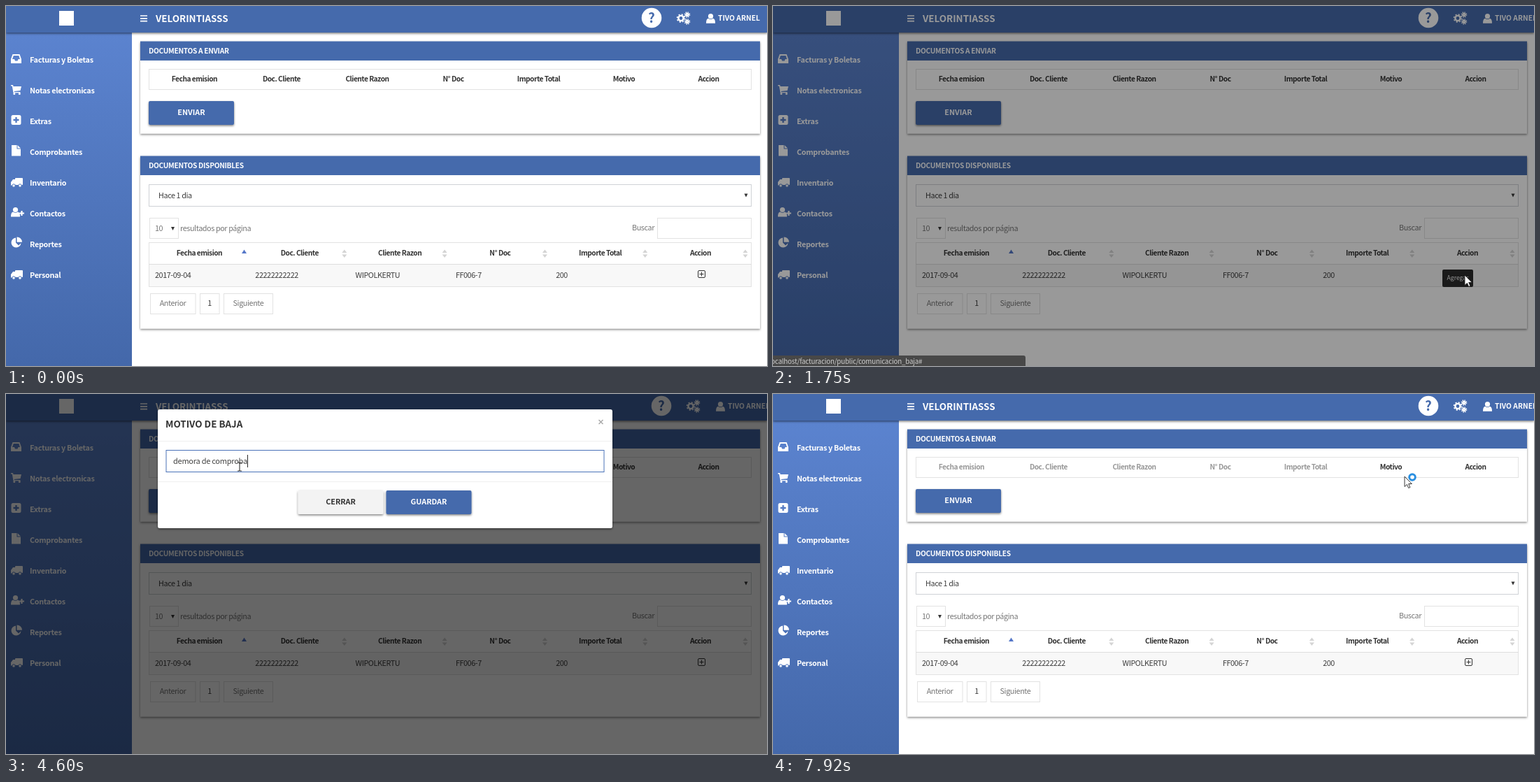
An HTML page that plays this animation: 1088 px wide and 515 px high, repeating every 8 s.

```html
<!DOCTYPE html>
<html lang="es">
<head>
<meta charset="utf-8">
<title>Documentos</title>
<style>
html, body { margin: 0; width: 100%; height: 100%; overflow: hidden; background: #fff; }
svg { display: block; width: 1088px; height: 515px; }
text { font-family: "Noto Sans CJK SC", "Noto Sans CJK JP", "Noto Sans CJK", Lato, sans-serif; font-size: 10.8px; white-space: pre; }
.menu { font-weight: 600; letter-spacing: -.3px; fill: #fff; }
.head { font-weight: 600; font-size: 10.2px; letter-spacing: -.5px; fill: #333; text-anchor: middle; }
.cell { letter-spacing: -.4px; fill: #3c3c3c; }
.soft { letter-spacing: -.4px; fill: #777; }
.caps { font-weight: 600; font-size: 10.2px; letter-spacing: -.3px; fill: #fff; }
.title { font-weight: 600; font-size: 13.4px; }
.btn { font-weight: 600; text-anchor: middle; }
.user { font-weight: 600; font-size: 10.3px; fill: #fff; }
.field { font-size: 11px; letter-spacing: -.25px; fill: #444; }
.mid { text-anchor: middle; }
.line { fill: #fff; stroke: #e2e2e2; }
.white { fill: #fff; }
.blue { fill: #456aac; }
</style>
</head>
<body>
<svg id="stage" viewBox="0 0 1088 515"></svg>
<script>
const BLUE = '#456aac';
const text = (x, y, s, cls, more = '') => `<text x="${x}" y="${y}" class="${cls}" ${more}>${s}</text>`;
const rect = (x, y, w, h, more = '') => `<rect x="${x}" y="${y}" width="${w}" height="${h}" ${more}/>`;
const path = (d, more = '') => `<path d="${d}" ${more}/>`;
const dot = (x, y, r, more = '') => `<circle cx="${x}" cy="${y}" r="${r}" ${more}/>`;
const group = (id, body, more = '') => `<g id="${id}" ${more}>${body}</g>`;

const truck = y => group('', rect(13, 0, 11, 10, 'rx="1"') + path('M7 10.500V6L10 2H13V10.500Z')
  + dot(11, 11, 2.2, 'stroke="#4f76bd"') + dot(20, 11, 2.2, 'stroke="#4f76bd"'), `transform="translate(0 ${y})"`);
const gear = (x, y, r) => dot(x, y, r, 'fill="none" stroke="#fff" stroke-width="2.4"')
  + dot(x, y, r + 1.9, `fill="none" stroke="#fff" stroke-width="1.6" stroke-dasharray="${(r + 1.9) * Math.PI / 8}"`);
const person = (x, y) => dot(x, y, 3.6) + path(`M${x - 6.5} ${y + 10}q0-6.500 3-7q3.500 2.500 7 0q3 .5 3 7z`);

function sidebar() {
  const items = ['Facturas y Boletas', 'Notas electronicas', 'Extras', 'Comprobantes',
    'Inventario', 'Contactos', 'Reportes', 'Personal'];
  const icons = path('M9.500 69H19.500L22 76V82H7V76ZM10.800 71L9 76H12L13 78.500H16.500L17.500 76H20L18.300 71Z', 'fill-rule="evenodd"')
    + path('M7 113H10L10.500 115H22L20.500 121L11.500 122L12 123H20.500V124.300H10.500L8.800 114.500H7Z')
    + dot(11.8, 125.4, 1.5) + dot(19.3, 125.4, 1.5)
    + rect(7.5, 156, 14, 14, 'rx="2.5"') + path('M14.500 159V167M10.500 163H18.500', 'stroke="#5379c2" stroke-width="2.3"')
    + path('M8 199H15.500V204.500H21V214.500H8ZM16.500 199L21 203.500H16.500Z')
    + truck(246) + person(13.5, 291.5) + path('M22.500 293V300M19 296.500H26', 'stroke="#fff" stroke-width="2.2"')
    + path('M14 331.500A7 7 0 1 0 21.500 339L18 342.500L14 338.500ZM15.500 330.500A7.200 7.200 0 0 1 23 337.700H15.500Z')
    + truck(378);
  return rect(0, 38, 180, 477, 'fill="url(#side)"') + group('', icons, 'class="white"')
    + items.map((s, i) => text(34, 81 + 44 * i, s, 'menu')).join('');
}

function header() {
  return rect(0, 0, 1088, 38, 'class="blue" filter="url(#drop)"')
    + rect(76, 7, 21, 21, 'class="white"')
    + path('M192 14H202M192 17.800H202M192 21.600H202', 'stroke="#fff" stroke-width="1.7"')
    + text(214, 23, 'VELORINTIASSS', 'title white')
    + group('tools', dot(923, 17, 14.3, 'class="white"')
      + text(923, 24, '?', 'title blue mid', 'style="font-size:19px"')
      + gear(965, 17.5, 3.6) + gear(974, 12.5, 1.6) + gear(974, 22.5, 1.6)
      + group('', person(1007.5, 14.7), 'class="white"') + text(1018, 20.5, 'TIVO ARNEL', 'user'));
}

const card = (y, h, title) => rect(192, y, 886, h, 'class="white" filter="url(#drop)"')
  + rect(192, y, 886, 27.5, 'class="blue"') + text(204, y + 17, title, 'caps');
const button = (x, y, label, fill, ink) => rect(x, y, 122, 34, `rx="2" fill="${fill}" filter="url(#drop)"`)
  + text(x + 61, y + 20, label, 'btn', `fill="${ink}"`);
const box = (x, y, w, h) => rect(x + .5, y + .5, w, h, 'class="line"');
const down = (x, y) => path(`M${x - 2.5} ${y - 2}h5l-2.500 5z`, 'fill="#333"');

function sorter(x, first) {
  return first ? path(`M${x - 3.5} 354l3.500-5.500l3.500 5.500z`, 'fill="#5577c8"')
    : path(`M${x - 3.5} 353l3.500-4.500l3.500 4.500zM${x - 3.5} 355.500l3.500 4.500l3.500-4.500z`, 'fill="#d4d4d4"');
}

function page() {
  const top = [['Fecha emision', 269.5], ['Doc. Cliente', 394], ['Cliente Razon', 516.5], ['N° Doc', 639.5],
    ['Importe Total', 761.5], ['Motivo', 883.5], ['Accion', 1004.5]];
  const low = ['Fecha emision', 'Doc. Cliente', 'Cliente Razon', 'N° Doc', 'Importe Total', 'Accion'];
  const row = ['2017-09-04', '22222222222', 'WIPOLKERTU', 'FF006-7', '200'];
  const heads = top.map(([s, x]) => text(x, 108, s, 'head'));
  return card(50.5, 132, 'DOCUMENTOS A ENVIAR') + box(204, 90, 861, 29)
    + group('covered', heads.slice(0, 5).join('')) + heads.slice(5).join('')
    + button(204, 136, 'ENVIAR', BLUE, '#fff')
    + card(214.5, 247, 'DOCUMENTOS DISPONIBLES')
    + rect(204.5, 255.5, 861, 31, 'fill="#fff" stroke="#cfd2d6"')
    + text(218, 275, 'Hace 1 dia', 'cell') + down(1058, 270.5)
    + box(205, 303, 41, 29) + text(213, 322, '10', 'soft') + down(238.5, 318)
    + text(249, 321.5, 'resultados por página', 'soft')
    + text(895, 321, 'Buscar', 'soft') + box(931, 303, 134, 29)
    + box(204, 338, 861, 63) + rect(205, 370, 860, 31, 'fill="#f8f8f8"') + path('M204 369.500H1066', 'stroke="#ddd"')
    + low.map((s, i) => text(276.5 + 143.3 * i, 357, s, 'head') + sorter(340.5 + 143.3 * i, !i)).join('')
    + row.map((s, i) => text(213 + 143.3 * i, 388.5, s, 'cell')).join('')
    + rect(989.5, 378.5, 10, 10, 'rx="1.5" fill="none" stroke="#333"') + path('M994.500 380.500V386.500M991.500 383.500H997.500', 'stroke="#333"')
    + box(206, 411, 64.5, 29) + box(277, 411, 27.5, 29) + box(311, 411, 70, 29)
    + text(238.5, 429, 'Anterior', 'soft mid') + text(291, 429, '1', 'cell mid') + text(346.5, 429, 'Siguiente', 'soft mid')
    + group('tip', rect(957, 377, 44, 25, 'rx="2" fill="#2b2b2b"')
      + text(979, 391.5, 'Agregar', 'mid white', 'style="font-size:8.600px"'));
}

function modal() {
  return rect(217, 22, 650, 170, 'rx="3" fill="#fff" filter="url(#drop)"')
    + text(228, 48, 'MOTIVO DE BAJA', 'title', 'fill="#333"')
    + path('M847.500 37L853.500 43M853.500 37L847.500 43', 'stroke="#aaa" stroke-width="1.5"')
    + path('M217 67.500H867M217 125.500H867', 'stroke="#efefef"')
    + rect(229, 80.5, 626, 31, 'id="field" fill="#fff"')
    + text(239, 100, 'Motivo', 'field', 'id="hint" style="fill:#888"')
    + text(239, 100, '', 'field', 'id="typed"')
    + rect(0, 87, 1, 18, 'id="caret" fill="#222"')
    + button(417.5, 138, 'CERRAR', '#f3f3f3', '#333') + button(543.5, 138, 'GUARDAR', BLUE, '#fff');
}

const arrow = path('M0 0V14.500L3.400 11.400L5.700 16.500L7.900 15.500L5.700 10.500H10.300Z', 'fill="#fff" stroke="#222" stroke-width=".9"');
const pointers = {
  arrow,
  busy: arrow + dot(11, 1, 4.3, 'fill="#fff" stroke="#2a8fe0" stroke-width="3"'),
  beam: path('M-3-6H-.8L0-5L.8-6H3M0-5V5M-3 6H-.8L0 5L.8 6H3', 'fill="none" stroke="#333" stroke-width="1.100"'),
  hand: path('M-1.500 1Q0-1 1.500 1V6Q3 5 4 6.500Q5.500 5.800 6.500 7.300Q8 7 8.300 8.500V13L6.500 18H-1L-5 11.500Q-5 9.500-3.300 10L-1.500 12Z',
    'fill="#fff" stroke="#222" stroke-linejoin="round"')
};

document.getElementById('stage').innerHTML = `<defs>
  <linearGradient id="side" x2="0" y2="1"><stop stop-color="#5b83cf"/><stop offset="1" stop-color="#4468aa"/></linearGradient>
  <filter id="drop" x="-5%" y="-10%" width="110%" height="140%"><feDropShadow dx="0" dy="1.5" stdDeviation="1.6" flood-opacity=".5"/></filter>
  </defs>` + rect(0, 0, 1088, 515, 'fill="#fff"') + sidebar() + page() + header()
  + rect(0, 0, 1088, 515, 'id="shade"') + group('modal', modal())
  + group('status', path('M0 500H358Q361 500 361 503V515H0Z', 'id="bar" fill="#484848"')
    + text(-3, 512, 'ocalhost/facturacion/public/comunicacion_baja#', '', 'fill="#ccc" style="font-size:9.800px;letter-spacing:-.2px"'))
  + Object.entries(pointers).map(([k, v]) => group(k, v)).join('');

const $ = id => document.getElementById(id);
const set = (id, name, value) => $(id).setAttribute(name, value);

// bursts of movement: start, end, number of screen updates
const bursts = [[0, 0, 1], [430, 1210, 11], [1280, 1430, 3], [1600, 2050, 7], [2280, 2440, 3],
  [6080, 6700, 9], [6850, 7080, 4], [7230, 7920, 10]];
function snap(t) {
  const [a, b, n] = bursts.findLast(r => r[0] <= t);
  if (n < 2) return a;
  const step = (b - a) / (n - 1);
  return a + step * Math.min(n - 1, Math.floor((t - a + 14) / step));
}

function at(keys, t) {
  const i = keys.findIndex(k => k[0] > t);
  if (i === 0) return keys[0].slice(1);
  if (i < 0) return keys.at(-1).slice(1);
  const [a, b] = [keys[i - 1], keys[i]];
  const f = (t - a[0]) / (b[0] - a[0]);
  return a.slice(1).map((v, j) => v + (b[j + 1] - v) * f);
}
const last = (keys, t) => keys.findLast(k => k[0] <= t)[1];

const moves = [[430, 1040, 505], [820, 1022, 440], [1210, 997, 392], [1430, 995, 387], [1675, 995, 387], [1750, 989, 385],
  [1900, 952, 376], [1975, 916, 367], [2050, 640, 98], [2280, 334, 104], [6080, 334, 104], [6390, 480, 132],
  [6622, 577, 157], [7230, 577, 157], [7920, 903, 118]];
const shapes = [[0, ''], [430, 'arrow'], [2050, 'beam'], [6160, 'arrow'], [6530, 'hand'], [7300, 'arrow'], [7690, 'busy']];
const shade = [[1675, 0], [1750, .4], [1825, .6], [7640, .6], [7850, 0]];
const panel = [[1825, 0, -45], [1900, .5, -44], [1975, 1, -34.5], [2050, 1, 0], [7300, 1, 0], [7640, 0, -42]];
const phrase = 'demora de comprobante';
const typing = [[0, 0], [2280, 3], [2360, 9], [2440, 13], [2590, 14], [2740, 15], [3140, 16], [3440, 17],
  [3520, 18], [5080, 19], [5460, 20], [5530, 21]];
const blink = [[0, 0], [2280, 1], [4070, 0], [4600, 1], [6080, 0], [6610, 1], [7140, 0]];

function draw(t) {
  const s = snap(t);
  const [x, y] = at(moves, s);
  const shape = last(shapes, s);
  for (const k in pointers) {
    set(k, 'visibility', k === shape ? 'visible' : 'hidden');
    set(k, 'transform', `translate(${x} ${y})`);
  }
  set('shade', 'opacity', at(shade, s)[0]);
  const [alpha, dy] = at(panel, s);
  set('modal', 'opacity', alpha);
  set('modal', 'transform', `translate(0 ${dy})`);
  set('tools', 'transform', `translate(${s >= 1750 ? 14 : 0} 0)`);
  set('tip', 'opacity', s < 2050 ? at([[1210, 0], [1430, 1]], s)[0] : 0);
  set('status', 'opacity', s >= 1130 && s < 2050 ? 1 : 0);
  set('bar', 'opacity', at([[1900, 1], [1975, .35]], s)[0]);
  set('covered', 'opacity', s >= 7640 ? .5 : 1);

  const n = last(typing, t);
  $('typed').textContent = phrase.slice(0, n);
  set('hint', 'opacity', n ? 0 : 1);
  set('field', 'stroke', n ? '#4a72b8' : '#c9ccd1');
  set('caret', 'opacity', last(blink, t));
  set('caret', 'x', 239 + (n ? $('typed').getComputedTextLength() : 0));
}

const start = performance.now();
function tick() {
  draw((performance.now() - start) % 8000);
  requestAnimationFrame(tick);
}
tick();
</script>
</body>
</html>
```
